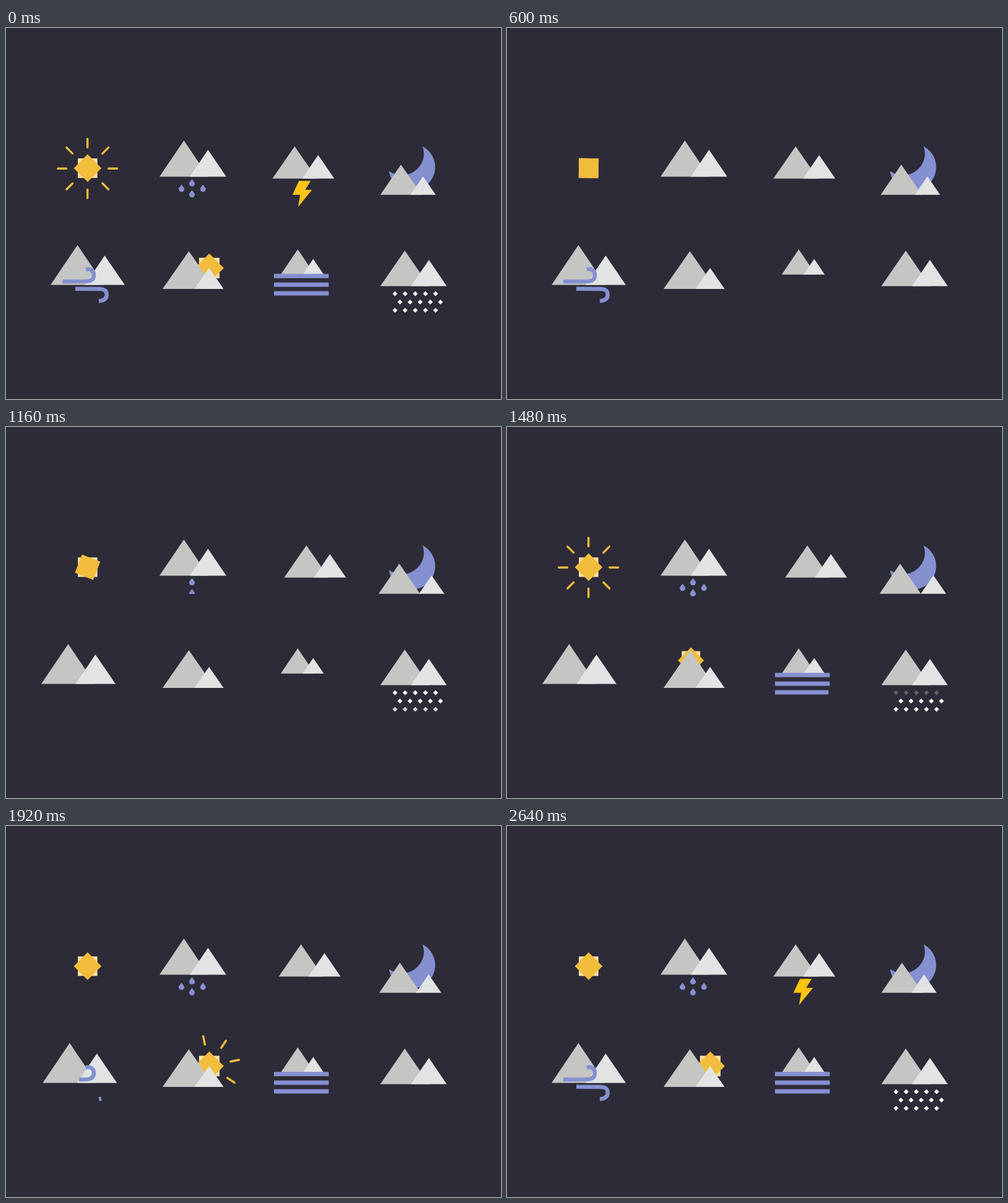
Write an HTML page with a canvas that moves like this. It is 800 px wide and 600 px high and loops after 2680 ms.

```html
<!DOCTYPE html>
<html lang="en">
<head>
<meta charset="utf-8">
<title>Weather icons</title>
<style>
  html, body { margin: 0; width: 100%; height: 100%; overflow: hidden; background: #2d2b37; }
  canvas { display: block; width: 800px; height: 600px; }
</style>
</head>
<body>
<canvas id="stage" width="800" height="600"></canvas>
<script>
const ctx = document.getElementById('stage').getContext('2d');
const LOOP = 2680, STEP = 40;
const NIGHT = '#2d2b37', STONE = '#c5c5c3', SNOW = '#e2e4e3';
const SUN = '#f2bd3c', CREAM = '#fae0a8', BLUE = '#8490d0', BOLT = '#ffc513';

const linear = (t, from, to) => Math.min(1, Math.max(0, (t - from) / (to - from)));
const ease = (t, from, to) => {
  const u = linear(t, from, to);
  return u * u * (3 - 2 * u);
};
// Rises to 1, then falls back to 0.
const pulse = (t, a, b, c, d) => ease(t, a, b) - ease(t, c, d);

function polygon(color, points) {
  ctx.fillStyle = color;
  ctx.beginPath();
  points.forEach(([x, y]) => ctx.lineTo(x, y));
  ctx.closePath();
  ctx.fill();
}

// A peak is [left, apex x, apex y, right].
function peak(color, [left, x, y, right], base, dx = 0) {
  polygon(color, [[left + dx, base], [x + dx, y], [right + dx, base]]);
}

function mountains(big, small, base, dxBig = 0, dxSmall = dxBig) {
  peak(STONE, big, base, dxBig);
  peak(SNOW, small, base, dxSmall);
}

function square(color, x, y, half, degrees) {
  ctx.save();
  ctx.translate(x, y);
  ctx.rotate(degrees * Math.PI / 180);
  ctx.fillStyle = color;
  ctx.fillRect(-half, -half, 2 * half, 2 * half);
  ctx.restore();
}

function star(x, y, half, degrees) {
  square(CREAM, x, y, half, 0);
  square(SUN, x, y, half, degrees);
}

function rays(x, y, radius, count, firstAngle, amount) {
  if (amount <= 0) return;
  const half = 6.9 * amount;
  ctx.strokeStyle = SUN;
  ctx.lineWidth = 3.4;
  ctx.lineCap = 'round';
  ctx.beginPath();
  for (let i = 0; i < count; i++) {
    const angle = (firstAngle + 45 * i) * Math.PI / 180;
    const c = Math.cos(angle), s = Math.sin(angle);
    ctx.moveTo(x + c * (radius - half), y + s * (radius - half));
    ctx.lineTo(x + c * (radius + half), y + s * (radius + half));
  }
  ctx.stroke();
}

function drawSun(t, opening) {
  star(131.9, 226.7, 15.8, 135 * ease(t, 540, 1385));
  rays(131.7, 227.2, 41, 8, 0, opening ? 1 : pulse(t, 1280, 1480, 1560, 1760));
}

function drop(x, y, shown) {
  if (shown <= 0) return;
  ctx.save();
  ctx.beginPath();
  ctx.rect(x - 6, y, 12, 12 * shown);
  ctx.clip();
  ctx.fillStyle = BLUE;
  ctx.beginPath();
  ctx.moveTo(x, y);
  ctx.bezierCurveTo(x + 1.5, y + 3, x + 4.6, y + 4.8, x + 4.6, y + 7.6);
  ctx.arc(x, y + 7.4, 4.6, 0, Math.PI);
  ctx.bezierCurveTo(x - 4.6, y + 4.8, x - 1.5, y + 3, x, y);
  ctx.fill();
  ctx.restore();
}

function drawRain(t) {
  mountains([248, 287.5, 182, 327], [297, 326.5, 197, 356], 240.5);
  drop(300.6, 244.3, linear(t, 960, 1080));
  drop(300.6, 262, linear(t, 1080, 1200));
  drop(283.7, 253.2, linear(t, 1200, 1320));
  drop(318.4, 253.2, linear(t, 1300, 1420));
}

function drawStorm(t) {
  const dx = 19 * pulse(t, 600, 1120, 1740, 2120);
  mountains([430.5, 466.5, 191.5, 502.5], [478.5, 504.5, 205.5, 530.5], 243.5, dx);
  const scale = 1.22 * ease(t, 2040, 2160) - 0.22 * ease(t, 2160, 2320);
  if (scale <= 0) return;
  ctx.save();
  ctx.translate(479, 268);
  ctx.scale(scale, scale);
  polygon(BOLT, [[-5.5, -20.7], [13.3, -20.7], [4.5, -6.2], [15.5, -6.2],
                 [-7, 21.5], [-3.5, 1.8], [-16, 1.8]]);
  ctx.restore();
}

function drawNight(t) {
  const outer = [656, 225, 37.7], inner = [640, 203, 35.2];
  const tip = [673, 191], tail = [620, 232];
  const angle = ([cx, cy], [x, y]) => Math.atan2(y - cy, x - cx);
  ctx.fillStyle = BLUE;
  ctx.beginPath();
  ctx.arc(...outer, angle(outer, tip), angle(outer, tail));
  ctx.arc(...inner, angle(inner, tail), angle(inner, tip), true);
  ctx.fill();
  const spread = pulse(t, 40, 1420, 1420, 2560);
  mountains([605, 638.3, 221, 672], [653.5, 674, 240, 694.5], 269.8, -3 * spread, 15.3 * spread);
}

function swirl(path, shown) {
  if (shown <= 0) return;
  ctx.strokeStyle = BLUE;
  ctx.lineWidth = 6.4;
  ctx.lineCap = 'butt';
  ctx.setLineDash([76 * shown, 200]);
  ctx.stroke(path);
  ctx.setLineDash([]);
}

const upperSwirl = new Path2D('M129 390.3C138 389 142 393 142 400C142 407 137 409.8 128 409.9L91 410');
const lowerSwirl = new Path2D('M150 441.6C159 440.8 162.8 437 162.8 431.5C162.8 424 158 422 150 422L112 421.8');

function drawWind(t) {
  const dx = -15 * pulse(t, 600, 1120, 1760, 2400);
  mountains([72, 115.5, 351, 159], [127.5, 159.5, 368, 192], 415.5, dx);
  swirl(upperSwirl, 1 - pulse(t, 600, 1000, 1660, 2100));
  swirl(lowerSwirl, 1 - pulse(t, 640, 1080, 1860, 2300));
}

function drawSunrise(t) {
  if (t > 1200) {
    const u = ease(t, 1200, 1720), v = 1 - u;
    const arc = (a, b, c) => v * v * a + 2 * u * v * b + u * u * c;
    star(arc(290, 280.5, 328.5), arc(404, 360, 388.2), 16.6 * (0.77 + 0.23 * u), 45);
  }
  rays(328.5, 388, 42, 4, -101.5, pulse(t, 1720, 1920, 2000, 2200));
  mountains([253, 295.5, 361, 338], [304.5, 328.2, 388, 351.7], 422);
}

function drawFog(t) {
  mountains([444, 471.5, 358, 499], [479.5, 496.5, 373.5, 513.5], 398.8);
  ctx.fillStyle = BLUE;
  for (let i = 0; i < 3; i++) {
    const start = 1160 + 60 * i;
    ctx.fillRect(433, 397.6 + 14 * i, 88.6 * ease(t, start, start + 220), 7);
  }
}

function drawSnow(t) {
  mountains([605, 644.5, 360, 684], [654.5, 683.5, 375, 712.3], 417.5);
  for (let row = 0; row < 3; row++) {
    const s = t - 160 * row;
    ctx.globalAlpha = linear(s, 712, 872) - linear(s, 1360, 1520) + linear(s, 2064, 2224);
    for (let i = 0; i < 5; i++) {
      square('#fff', 628.7 + 16.4 * i + (row === 1 ? 7.9 : 0), 429.8 + 13.4 * row, 2.8, 45);
    }
  }
  ctx.globalAlpha = 1;
}

function draw(now) {
  const time = Math.floor(now % LOOP / STEP) * STEP;
  const opening = time < STEP;
  // The loop opens on the finished set before everything resets.
  const t = opening ? LOOP - STEP : time;
  ctx.fillStyle = NIGHT;
  ctx.fillRect(0, 0, 800, 600);
  drawSun(t, opening);
  drawRain(t);
  drawStorm(t);
  drawNight(t);
  drawWind(t);
  drawSunrise(t);
  drawFog(t);
  drawSnow(t);
}

const startTime = performance.now();
function tick() {
  draw(performance.now() - startTime);
  requestAnimationFrame(tick);
}
tick();
</script>
</body>
</html>
```
